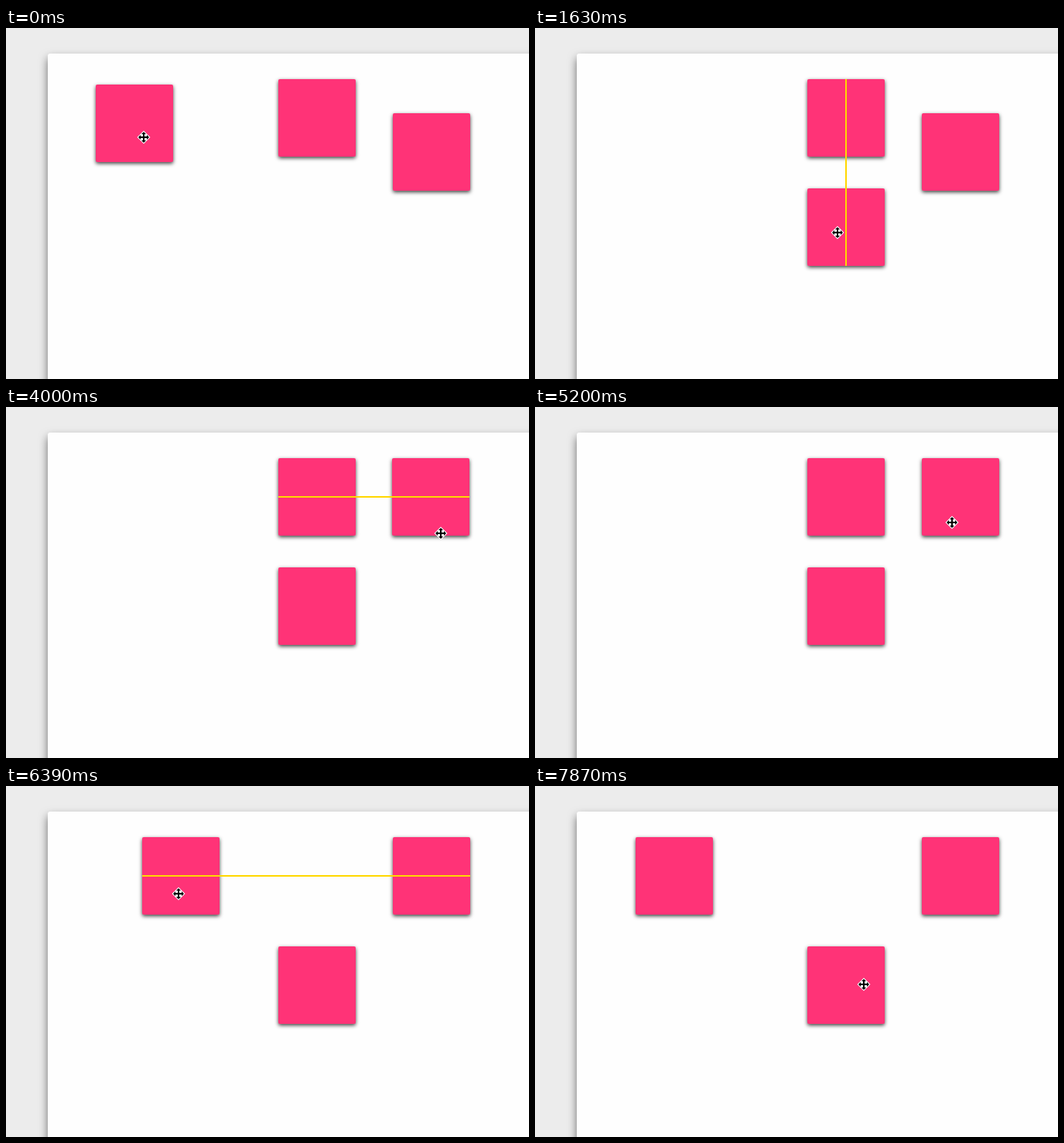
An HTML page with a canvas for the animation above (8 s loop, 676x453 px).

```html
<!DOCTYPE html>
<html lang="en">
<head>
<meta charset="utf-8">
<title>Snapping guides</title>
<style>
  html, body { margin: 0; height: 100%; overflow: hidden; background: #ececec; }
  canvas { display: block; }
</style>
</head>
<body>
<canvas id="stage" width="676" height="453"></canvas>
<script>
const ctx = document.getElementById('stage').getContext('2d');
const LOOP = 8000;
const STEP = 148.5;   // the picture advances in steps of this many ms
const LEAD = 15;
const SIZE = 100;

const linear = u => u;
const easeIn = u => u * u;
const easeOut = u => 1 - (1 - u) ** 2;
const smooth = u => u * u * (3 - 2 * u);

const start = { left: [116, 73], middle: [352, 66], right: [500, 110], cursor: [178, 141] };

// Each move brings the named parts to new places between two steps.
const moves = [
  { steps: [0, 3], ease: smooth, cursor: [157, 131] },
  { steps: [3, 7], ease: easeIn, cursor: [238, 252], left: [168, 177] },
  { steps: [7, 9], ease: linear, cursor: [362, 273], left: [316, 216] },
  { steps: [9, 11], ease: easeOut, cursor: [391, 264] },
  { steps: [9, 10], ease: linear, left: [352, 207] },
  { steps: [17, 22], ease: smooth, cursor: [572, 195] },
  { steps: [23, 26], ease: smooth, cursor: [562, 125], right: [499, 36] },
  { steps: [26, 27], ease: linear, cursor: [562, 163], right: [499, 66] },
  { steps: [27, 31], ease: easeOut, cursor: [562, 151], right: [500, 66] },
  { steps: [34, 38], ease: smooth, cursor: [412, 141] },
  { steps: [39, 43], ease: easeIn, cursor: [223, 139], middle: [176, 66] },
  { steps: [43, 47], ease: easeOut, cursor: [190, 140], middle: [130, 66] },
  { steps: [47, 53], ease: smooth, cursor: [425, 256] }
];

function positionsAt(step) {
  const pos = { ...start };
  for (const { steps: [from, to], ease, ...targets } of moves) {
    if (step <= from) break;
    const u = ease(Math.min(1, (step - from) / (to - from)));
    for (const part in targets) {
      pos[part] = pos[part].map((v, i) => Math.round(v + (targets[part][i] - v) * u));
    }
  }
  return pos;
}

function card(x, y, w, h, color, radius, shadow) {
  ctx.save();
  [ctx.shadowOffsetY, ctx.shadowBlur, ctx.shadowColor] = shadow;
  ctx.fillStyle = color;
  ctx.beginPath();
  ctx.roundRect(x, y, w, h, radius);
  ctx.fill();
  ctx.restore();
}

function drawGuide(step, { left, middle, right }) {
  const during = (from, to) => step >= from && step <= to;
  const half = SIZE / 2 - 1;
  ctx.fillStyle = '#ffd800';
  if (step === 9) {
    ctx.fillRect(left[0] + half, 33, 2, 420);
  } else if (during(10, 17)) {
    ctx.fillRect(left[0] + half, middle[1], 2, left[1] + SIZE - middle[1]);
  } else if (during(27, 34) || during(40, 47)) {
    ctx.fillRect(middle[0], middle[1] + half, right[0] + SIZE - middle[0], 2);
  }
}

function drawCursor([x, y]) {
  ctx.save();
  ctx.translate(x, y);
  ctx.fillStyle = '#fff';
  ctx.fill(new Path2D('M0-8.5 8.5 0 0 8.5-8.5 0Z'));
  ctx.fillStyle = '#000';
  for (let arm = 0; arm < 4; arm++) {
    ctx.fill(new Path2D('M0-7 3-4H1V1H-1V-4H-3Z'));
    ctx.rotate(Math.PI / 2);
  }
  ctx.restore();
}

function draw(time) {
  const step = Math.floor((time % LOOP + LEAD) / STEP);
  const pos = positionsAt(step);
  ctx.fillStyle = '#ececec';
  ctx.fillRect(0, 0, 676, 453);
  card(54, 33, 700, 500, '#fefefe', 3, [6, 12, 'rgba(0, 0, 0, .55)']);
  for (const part of ['left', 'middle', 'right']) {
    card(...pos[part], SIZE, SIZE, '#ff3377', 2, [2, 5, 'rgba(0, 0, 0, .75)']);
  }
  drawGuide(step, pos);
  drawCursor(pos.cursor);
}

let origin;
function frame(now) {
  origin ??= now;
  draw(now - origin);
  requestAnimationFrame(frame);
}
draw(0);
requestAnimationFrame(frame);
</script>
</body>
</html>
```
